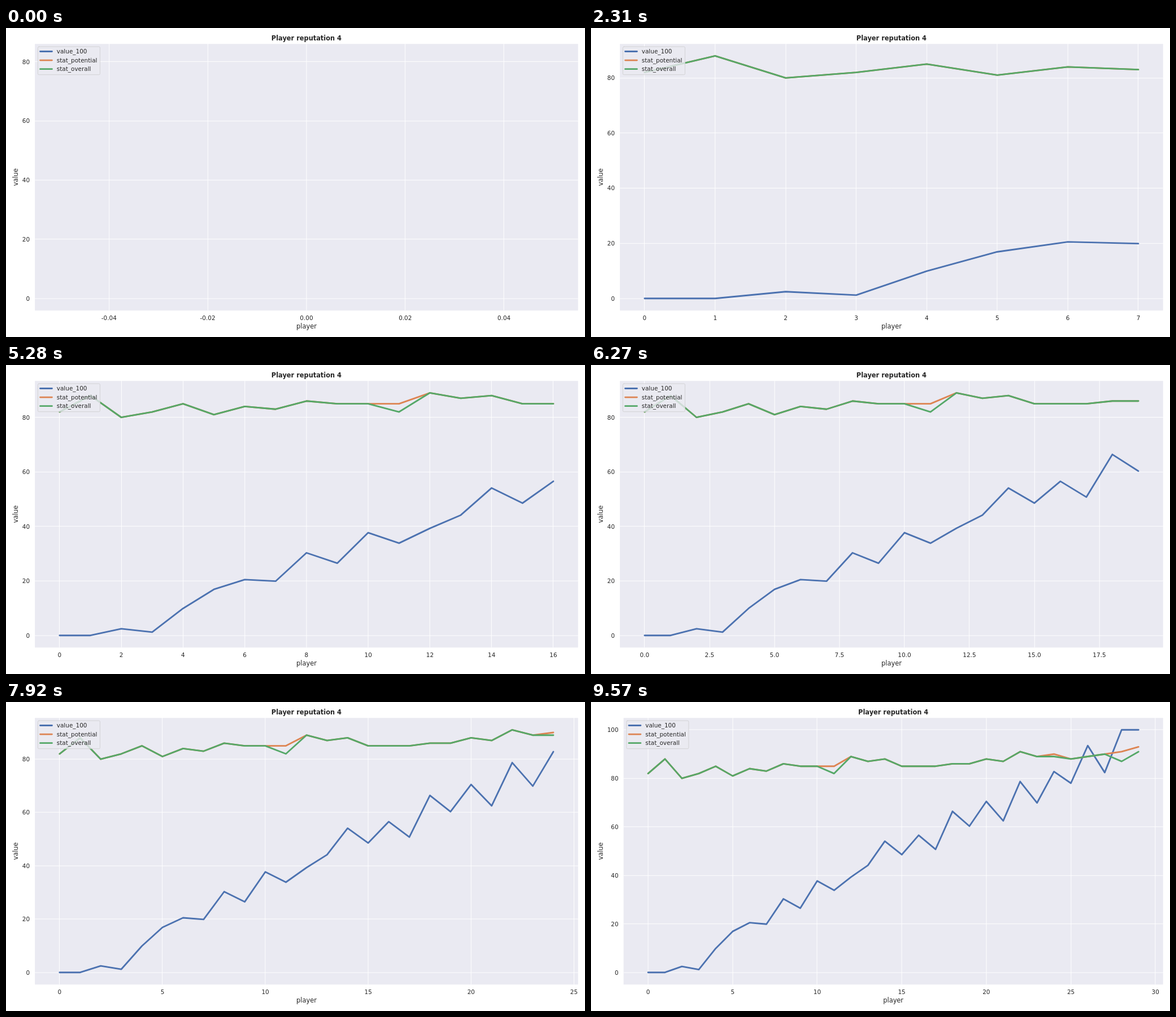
These frames come from a looping animation (1025x547 px, 9900 ms). An HTML page with a canvas:

```html
<!DOCTYPE html>
<html lang="en">
<head>
<meta charset="utf-8">
<title>Player reputation 4</title>
<style>
  html, body { margin: 0; width: 100%; height: 100%; overflow: hidden; background: #fff; }
  canvas { display: block; width: 1025px; height: 547px; }
</style>
</head>
<body>
<canvas id="chart" width="1025" height="547"></canvas>
<script>
const STEP = 330, COUNT = 30;
const W = 1080, H = 576;            // layout units, scaled to the stage
const RIGHT = 1067.04, TOP = 29.3, BOTTOM = 526.7;
const FONT = '"DejaVu Sans", sans-serif';
const INK = '#262626', PANEL = '#eaeaf2';

const value = [0, 0, 2.45, 1.2, 9.9, 16.9, 20.5, 19.9, 30.3, 26.5, 37.7, 33.85, 39.3, 44.15, 54.1,
  48.55, 56.55, 50.75, 66.4, 60.3, 70.5, 62.5, 78.7, 69.9, 82.8, 78, 93.5, 82.4, 100, 100];
const overall = [82, 88, 80, 82, 85, 81, 84, 83, 86, 85, 85, 82, 89, 87, 88,
  85, 85, 85, 86, 86, 88, 87, 91, 89, 89, 88, 89, 90, 87, 91];
const potential = Object.assign([...overall], { 11: 85, 24: 90, 28: 91, 29: 93 });

const series = [
  { name: 'value_100', color: '#4c72b0', data: value },
  { name: 'stat_potential', color: '#dd8452', data: potential },
  { name: 'stat_overall', color: '#55a868', data: overall }
];

const canvas = document.getElementById('chart');
const ctx = canvas.getContext('2d');
ctx.scale(canvas.width / W, canvas.height / H);

// Smallest round step that gives at most nine intervals
function tickStep(span) {
  const raw = span / 9;
  const mag = 10 ** Math.floor(Math.log10(raw));
  return mag * [1, 2, 2.5, 5, 10].find(m => m * mag >= raw - 1e-9);
}

function ticks(lo, hi) {
  const step = tickStep(hi - lo);
  const digits = [0, 1, 2].find(d => Math.abs(step - step.toFixed(d)) < 1e-9);
  const list = [];
  for (let k = Math.ceil(lo / step); k * step <= hi; k++) {
    list.push({ at: k * step, label: (k * step).toFixed(digits) });
  }
  return list;
}

function text(str, x, y, align = 'center', size = 11, weight = 'normal') {
  ctx.font = `${weight} ${size}px ${FONT}`;
  ctx.textAlign = align;
  ctx.fillStyle = INK;
  ctx.fillText(str, x, y);
}

function stroke(points, color, width) {
  ctx.beginPath();
  points.forEach(([x, y]) => ctx.lineTo(x, y));
  ctx.strokeStyle = color;
  ctx.lineWidth = width;
  ctx.stroke();
}

const snap = v => Math.floor(v) + 0.5;

function drawLegend(left) {
  const x = left + 5.5, y = TOP + 5.5;
  ctx.globalAlpha = 0.8;
  ctx.beginPath();
  ctx.roundRect(x, y, 116, 52.3, 2.2);
  ctx.fillStyle = PANEL;
  ctx.fill();
  ctx.strokeStyle = '#ccc';
  ctx.lineWidth = 1;
  ctx.stroke();
  ctx.globalAlpha = 1;
  series.forEach((s, i) => {
    const row = 43.7 + i * 16.4;
    stroke([[x + 4.4, row], [x + 26.4, row]], s.color, 3);
    text(s.name, x + 35.2, row + 4, 'left');
  });
}

function draw(last) {
  const peak = Math.max(...series.flatMap(s => s.data.slice(0, last + 1)));
  const yLo = -0.05 * peak, yHi = 1.05 * peak;
  const pad = last ? last * 0.05 : 0.055;
  const xLo = -pad, xHi = last + pad;
  const left = yHi >= 100 ? 60.7 : 53.9;   // room for a third digit
  const mid = (left + RIGHT) / 2;
  const px = v => left + (v - xLo) / (xHi - xLo) * (RIGHT - left);
  const py = v => BOTTOM - (v - yLo) / (yHi - yLo) * (BOTTOM - TOP);

  ctx.fillStyle = '#fff';
  ctx.fillRect(0, 0, W, H);
  ctx.fillStyle = PANEL;
  ctx.fillRect(left, TOP + 0.4, RIGHT - left, BOTTOM - TOP - 0.4);
  ctx.lineCap = 'butt';

  for (const t of ticks(xLo, xHi)) {
    const x = snap(px(t.at));
    stroke([[x, TOP], [x, BOTTOM]], '#fff', 1);
    text(t.label, px(t.at), 544.3);
  }
  for (const t of ticks(yLo, yHi)) {
    const y = snap(py(t.at));
    stroke([[left, y], [RIGHT, y]], '#fff', 1);
    text(t.label, left - 9.5, py(t.at) + 4, 'right');
  }

  ctx.lineCap = ctx.lineJoin = 'round';
  for (const s of series) {
    if (last) stroke(s.data.slice(0, last + 1).map((v, i) => [px(i), py(v)]), s.color, 3);
  }
  drawLegend(left);

  text('Player reputation 4', mid, 23, 'center', 12, 'bold');
  text('player', mid, 560, 'center', 12);
  ctx.save();
  ctx.translate(22.1, (TOP + BOTTOM) / 2);
  ctx.rotate(-Math.PI / 2);
  text('value', 0, 0, 'center', 12);
  ctx.restore();
}

const start = performance.now();
let shown = -1;
function tick() {
  const step = Math.floor((performance.now() - start) / STEP) % COUNT;
  if (step !== shown) draw(shown = step);
  requestAnimationFrame(tick);
}
tick();
</script>
</body>
</html>
```
